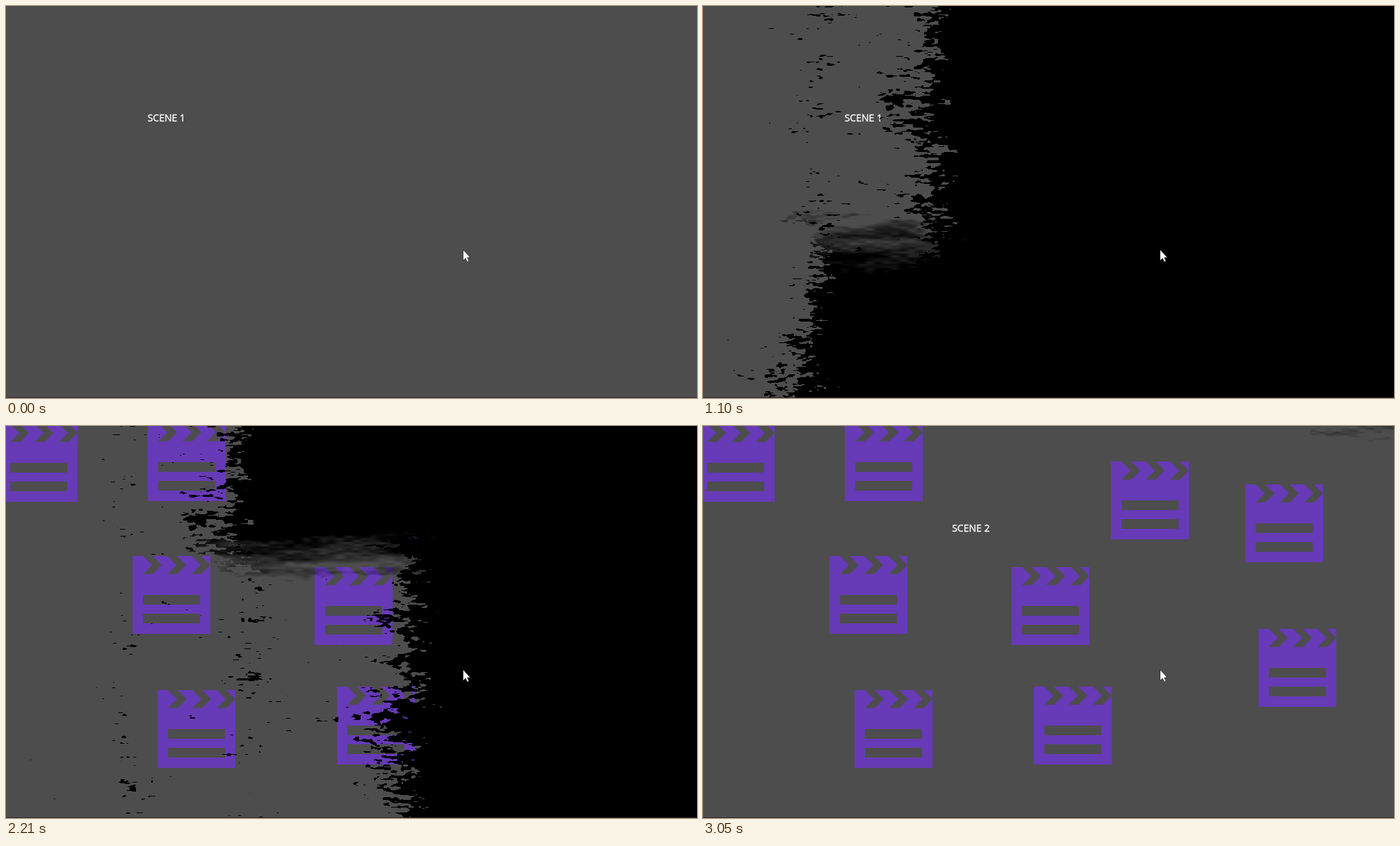
Write an HTML page with a canvas that moves like this. It is 994x564 px and loops after 3.6 s.

```html
<!DOCTYPE html>
<html lang="en">
<head>
<meta charset="utf-8">
<title>Scene transition</title>
<style>
  html, body { margin: 0; width: 994px; height: 564px; overflow: hidden; background: #4d4d4d; }
  svg, canvas { position: absolute; left: 0; top: 0; display: block; }
  text { font: 14px "Open Sans", "Noto Sans", sans-serif; fill: #fff; stroke: #fff; stroke-width: .35px; }
</style>
</head>
<body>
<svg width="994" height="564">
  <defs>
    <g id="clap">
      <path fill="#673ab7" d="M0 0H112V112H0Z"/>
      <path fill="#4d4d4d" d="M15 56h82v14H15zM15 83h82v14H15z"/>
      <path id="chev" fill="#4d4d4d" d="M15 0H29L42 13L29 26H15L28 13Z"/>
      <use href="#chev" x="35"/>
      <use href="#chev" x="70"/>
    </g>
  </defs>
  <g id="one"><text x="203.7" y="166">SCENE 1</text></g>
  <g id="two"><text x="358.2" y="152">SCENE 2</text></g>
</svg>
<canvas id="ink" width="994" height="564"></canvas>
<svg width="994" height="564">
  <path d="M0 563.5H994" stroke="#30272c"/>
  <path d="M657.5 350.5V366.5L661 363L663.5 368.3L666 367.2L663.7 362H668Z" fill="#fff" stroke="#222" stroke-width=".8"/>
</svg>
<script>
const W = 994, H = 564, LOOP = 3600, STEP = 70;
const COVER = 400, REVEAL = 1510, LEAD = 60, SOFT = 0.1;
const $ = id => document.getElementById(id);
const clamp = (v, lo, hi) => Math.min(hi, Math.max(lo, v));

const claps = [[-9, -3], [204, -4], [182, 187], [444, 203], [218, 380], [476, 375], [587, 51], [780, 84], [799, 292]];
$('two').insertAdjacentHTML('afterbegin',
  claps.map(([x, y]) => `<use href="#clap" x="${x}" y="${y}"/>`).join(''));

// Left side of each brush stroke: solid limit, bristle length, height at which the bristles are longest.
const edges = [
  { x: 912, bristle: 55, swell: 470 },
  { x: 634, bristle: 80, swell: 440 },
  { x: 386, bristle: 80, swell: 130 },
  { x: 202, bristle: 60, swell: 535 }
];

function hash(x, y) {
  let h = Math.imul(x, 374761393) + Math.imul(y, 668265263);
  h = Math.imul(h ^ (h >>> 13), 1274126177);
  return ((h ^ (h >>> 16)) >>> 0) / 4294967296;
}

function noise(x, y) {
  const ix = Math.floor(x), iy = Math.floor(y);
  let u = x - ix, v = y - iy;
  u *= u * (3 - 2 * u);
  v *= v * (3 - 2 * v);
  const a = hash(ix, iy), b = hash(ix + 1, iy), c = hash(ix, iy + 1), d = hash(ix + 1, iy + 1);
  return a + (b - a) * u + (c - a + (a - b - c + d) * u) * v;
}

function reachAt(edge, y) {
  const swell = Math.exp(-(((y - edge.swell) / 55) ** 2));
  return edge.bristle + 45 * noise(edge.x, y / 28) + 55 * swell;
}

// Moment at which each pixel is painted, in strokes: five of them, down and up by turns, right to left.
function paintOrder() {
  const order = new Float32Array(W * H);
  for (let y = 0; y < H; y++) {
    const reach = edges.map(e => reachAt(e, y));
    for (let x = 0; x < W; x++) {
      const grain = 0.45 * noise(x / 14, y / 4) + 0.28 * noise(x / 5 + 90, y / 2) + 0.27 * noise(x / 45, y / 14 + 70);
      const k = edges.findIndex((e, i) => {
        const depth = 1 - (e.x - x) / reach[i];
        return depth > 1 || grain > 0.78 - (depth < 0 ? 0.2 : 0.68) * depth;
      });
      const stroke = k < 0 ? 4 : k;
      const along = stroke % 2 ? 1 - y / H : y / H;
      let v = stroke + along + 0.08 * (noise(x / 70, y / 10 + 30) - 0.5) + 0.04 * (noise(x / 12, y / 3 + 50) - 0.5);
      if (stroke === 0) v += along * (0.12 * (950 - x) / 86 - 0.1);
      if (k > 0) {
        // Stray specks near the edge are painted ahead of their stroke.
        const near = Math.max(0, 1 - Math.abs(x - edges[k].x + 35) / 65);
        const ahead = 15 * (grain + 0.18 * near - 0.86);
        if (ahead > 0) v = Math.max(0.15, v - ahead);
      }
      order[y * W + x] = Math.min(v, 4.92);
    }
  }
  return order;
}

const order = paintOrder();
const ctx = $('ink').getContext('2d');
const img = ctx.createImageData(W, H);

// Covering takes 1060 ms and revealing 1600 ms, both in steps.
function inkAt(t) {
  if (t < COVER) return -1;
  const covering = t < REVEAL;
  const from = covering ? COVER : REVEAL;
  const run = LEAD + STEP * Math.floor((t - from) / STEP);
  const p = covering ? run / 1060 : 1 - run / 1600;
  return 5.15 * clamp(p, 0, 1) ** 1.2;
}

let shown = null;
function draw(t) {
  const ink = inkAt(t), second = t >= REVEAL - LEAD;
  $('one').style.display = second ? 'none' : '';
  $('two').style.display = second ? '' : 'none';
  if (ink === shown) return;
  shown = ink;
  for (let i = 0; i < order.length; i++) img.data[i * 4 + 3] = 255 * clamp((ink - order[i]) / SOFT, 0, 1);
  ctx.putImageData(img, 0, 0);
}

const start = performance.now();
function tick() {
  draw((performance.now() - start) % LOOP);
  requestAnimationFrame(tick);
}
tick();
</script>
</body>
</html>
```
